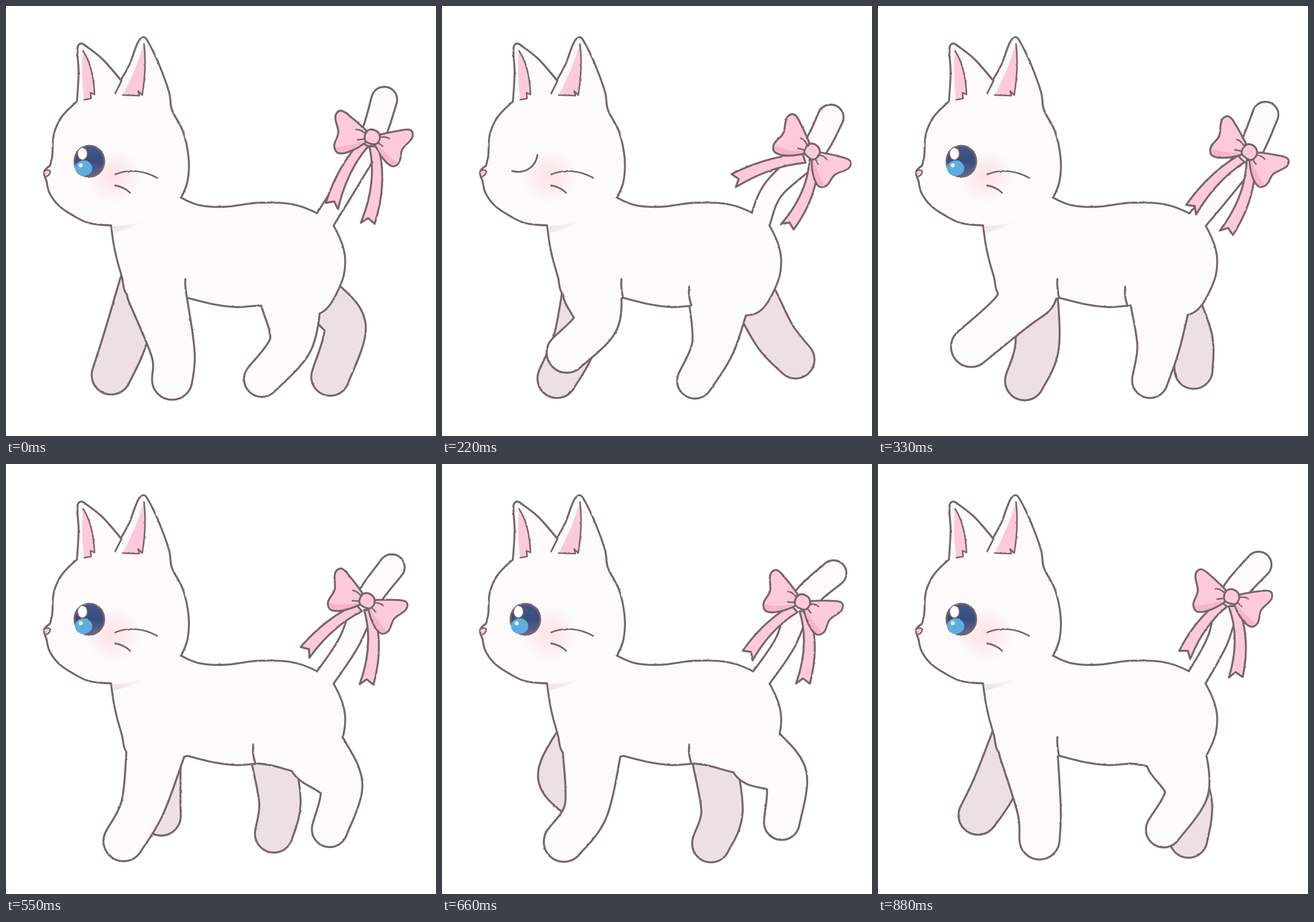
Animation, 748 px wide and 748 px high, one loop 990 ms. Source, as an HTML page:

```html
<!DOCTYPE html>
<html lang="en">
<head>
<meta charset="utf-8">
<title>Walking cat</title>
<style>
  html, body { margin: 0; width: 100%; height: 100%; overflow: hidden; background: #fff; }
  svg { display: block; width: 100vw; height: 100vh; }
  .pose { opacity: 0; animation: show 990ms step-end infinite; }
  @keyframes show { 0% { opacity: 1; } 11.1111% { opacity: 0; } 100% { opacity: 0; } }
  .line, .rim { fill: none; stroke: #77656a; stroke-width: 3.4; stroke-linecap: round; stroke-linejoin: round; }
  .rim { stroke-width: 6.8; }
  .fur { fill: #fcfafb; }
  .far { fill: #ece0e3; }
  .ear { fill: #ffc8dc; }
  .bow { fill: #fec9db; }
  .fold { fill: #f6b5c6; }
</style>
</head>
<body>
<svg viewBox="0 0 748 748">
  <defs>
    <radialGradient id="blush">
      <stop offset="0" stop-color="#ffd6d8" stop-opacity=".65"/>
      <stop offset=".5" stop-color="#ffdcde" stop-opacity=".45"/>
      <stop offset="1" stop-color="#ffe4e6" stop-opacity="0"/>
    </radialGradient>
    <linearGradient id="iris" x2="0" y2="1">
      <stop offset="0" stop-color="#41598a"/>
      <stop offset=".5" stop-color="#384d7d"/>
      <stop offset="1" stop-color="#626a8e"/>
    </linearGradient>
    <linearGradient id="chin">
      <stop offset="0" stop-color="#e6d9dd" stop-opacity=".7"/>
      <stop offset="1" stop-color="#e6d9dd" stop-opacity="0"/>
    </linearGradient>
    <filter id="pencil" filterUnits="userSpaceOnUse" x="0" y="0" width="748" height="748" color-interpolation-filters="sRGB">
      <feTurbulence type="fractalNoise" baseFrequency=".12" numOctaves="2" seed="4"/>
      <feDisplacementMap in="SourceGraphic" scale="2" xChannelSelector="R" yChannelSelector="G"/>
    </filter>
  </defs>
  <g id="stage" filter="url(#pencil)"></g>
</svg>
<script>
const STEPS = 9, STEP_MS = 110;
const KEY_STEPS = [0, 2, 3, 4, 6, 8];
const LINE = 3.4;

const numbers = text => text.match(/-?[\d.]+/g).map(Number);
const mix = (a, b, t) => a + (b - a) * t;
const mixAll = (a, b, t) => a.map((v, i) => mix(v, b[i], t));

// Values at the key steps, blended linearly in between.
function track(text) {
  const keys = text.split('|').map(numbers);
  return step => {
    const i = KEY_STEPS.findLastIndex(key => key <= step);
    if (KEY_STEPS[i] === step) return keys[i];
    return mixAll(keys[i], keys[i + 1], (step - KEY_STEPS[i]) / (KEY_STEPS[i + 1] - KEY_STEPS[i]));
  };
}

// Each leg: hip root, how far the hip follows the knee, radii, and knee and foot positions.
const legs = {
  nearFront: { root: [261, 495], follow: 0, radii: [51, 38, 35],
    joints: track('290 600 289 650|268 550 217 603|235 530 162 593|225 590 197 655|251 600 212 657|280 600 281 653') },
  nearHind: { root: [495, 508], follow: .55, radii: [53, 37, 31],
    joints: track('496 585 445 649|472 590 440 652|488 590 473 651|568 575 535 648|598 545 591 623|537 570 497 636') },
  farFront: { root: [270, 480], follow: .55, radii: [37, 38, 34],
    joints: track('207 580 183 642|232 580 200 648|277 590 255 652|326 597 315 650|205 540 225 575|203 560 174 611') },
  farHind: { root: [420, 515], follow: .8, radii: [38, 36, 33],
    joints: track('590 560 564 645|580 575 615 615|546 580 549 633|466 575 464 626|487 605 468 660|545 590 540 652') }
};
const bowAt = track('637 228 0 0|644 253 24 -22|646 254 20 0|629 236 12 4|627 240 11 6|615 231 2 6'); // x, y, tilt, tail bend
const tailTip = track('658 163|676 194|674 189|661 169|681 190|662 175');
const ribbonEnds = track('571 340 630 369|516 301 604 376|551 348 609 386|516 317 627 376|538 327 628 373|539 325 622 362');

// Smooth curve through points; listed indices stay sharp.
function curve(text, sharp = []) {
  const list = numbers(text), n = list.length / 2;
  const at = i => list.slice((i + n) % n * 2, (i + n) % n * 2 + 2);
  const handle = (i, length) => {
    const [ax, ay] = at(i - 1), [bx, by] = at(i + 1), [x, y] = at(i);
    const k = sharp.includes(i % n) ? 0 : length / Math.hypot(bx - ax, by - ay);
    return [x + (bx - ax) * k, y + (by - ay) * k];
  };
  let d = `M${at(0)}`;
  for (let i = 0; i < n; i++) {
    const p = at(i), q = at(i + 1), reach = Math.hypot(q[0] - p[0], q[1] - p[1]) * .34;
    d += `C${handle(i, reach)} ${handle(i + 1, -reach)} ${q}`;
  }
  return d + 'Z';
}

const path = (d, cls) => `<path d="${d}" class="${cls}"/>`;
const line = (d, width = LINE) => `<path d="${d}" class="line" style="stroke-width:${width}"/>`;
const shape = (d, cls) => path(d, cls) + line(d);

// One outline around several overlapping shapes.
const merged = (parts, cls) => parts.map(d => path(d, 'rim')).join('') + parts.map(d => path(d, cls)).join('');

const circle = ([x, y, r]) => `M${x - r},${y}a${r},${r} 0 1 0 ${2 * r},0a${r},${r} 0 1 0 ${-2 * r},0`;

const spline = (a, b, c, d, t) => b.map((v, i) =>
  v + t / 2 * (c[i] - a[i] + t * (2 * a[i] - 5 * v + 4 * c[i] - d[i] + t * (3 * (v - c[i]) + d[i] - a[i]))));

// Tube swept along [x, y, radius] nodes.
function limb(nodes, samples = 30) {
  const at = i => nodes[Math.max(0, Math.min(nodes.length - 1, i))];
  let d = '';
  for (let s = 0; s <= samples * (nodes.length - 1); s++) {
    const i = Math.min(Math.floor(s / samples), nodes.length - 2);
    const [x, y, r] = spline(at(i - 1), at(i), at(i + 1), at(i + 2), s / samples - i);
    d += circle([x, y, r - LINE / 2].map(v => +v.toFixed(1)));
  }
  return d;
}

function leg({ root: [x, y], follow, radii, joints }, step) {
  const [kneeX, kneeY, footX, footY] = joints(step);
  return limb([[mix(x, kneeX, follow), y, radii[0]], [kneeX, kneeY, radii[1]], [footX, footY, radii[2]]]);
}

function tail(step) {
  const [x, y, , bend] = bowAt(step), base = [553, 375];
  return limb([[...base, 18], [(base[0] + x) / 2 + bend, (base[1] + y) / 2 + 5, 18], [x, y, 21], [...tailTip(step), 22.5]]);
}

const torso = curve(`184,378 191,425 203,470 214,503 260,515 316,506 360,517 400,522 447,520 540,535
  578,490 588,437 569,384 548,366 500,347 440,344 380,351 335,348 302,334 250,320`, [0, 5, 18]);
const head = curve(`303,333 314,305 316,265 306,218 287,181 282,150 262,96 245,62 239,56 231,64 216,103 200,132
  166,93 138,71 130,67 126,74 128,115 125,167 99,193 85,223 82,262 78,279 68,289 72,304 77,324 92,345
  116,362 145,376 186,380`, [0, 11, 17, 21, 28]);

const innerEar = (rim, edge) => path(rim + edge, 'ear') + line(rim, 2.7);
const ears = line('M201,130L190,152', 3) +
  innerEar('M134,78Q152,105 154,154L147,151L148,161L136,163', 'Q130,115 134,78Z') +
  innerEar('M240,66Q245,105 237,155L230,148L232,156L203,155', 'Q227,110 240,66Z');

const openEye = `
  <ellipse cx="145" cy="270" rx="26" ry="27" fill="url(#iris)" stroke="#7d646b" stroke-width="3"/>
  <ellipse cx="135" cy="282" rx="15" ry="13.5" fill="#5eade0"/>
  <ellipse cx="133" cy="257" rx="8.5" ry="11" fill="#fff" stroke="#7d646b" stroke-width="1.5"/>
  <circle cx="130" cy="277" r="3.5" fill="#e4f5ff"/>`;
const nose = 'M66,288Q72,283 77,287Q77,294 70,297';
const face = step => `
  <circle cx="187" cy="296" r="48" fill="url(#blush)"/>
  <path d="M184,383Q215,383 242,372Q220,388 187,394Z" fill="url(#chin)"/>
  ${path(nose + 'Z', 'ear')}${line(nose, 2.4)}
  ${line('M190,293C212,283 240,286 263,299', 2.8)}${line('M190,312Q206,315 216,325', 2.8)}
  ${step === 2 ? line('M122,287C140,292 162,284 166,259', 3) : openEye}`;

// Forked strip from start to end, bowed sideways by bulge.
function ribbon(start, end, bulge) {
  const dx = end[0] - start[0], dy = end[1] - start[1], length = Math.hypot(dx, dy);
  const [ux, uy] = [dx / length, dy / length];
  const off = ([x, y], side, along = 0) => [x - uy * side + ux * along, y + ux * side + uy * along];
  const middle = mixAll(start, end, .5);
  return shape(`M${off(start, 8)}Q${off(middle, bulge + 9)} ${off(end, 12, 9)}L${end}
    L${off(end, -12, 9)}Q${off(middle, bulge - 9)} ${off(start, -8)}Z`, 'bow');
}

const loop = curve('-11,-12 -37,-35 -55,-46 -64,-36 -59,-8 -66,16 -58,28 -34,23 -11,9', [0, 8]);
const knot = curve('-11,-8 0,-13 12,-6 11,9 0,12 -11,8');
const bowSide = path(loop, 'bow') + path('M-64,17Q-45,18 -13,6L-32,21Q-58,34 -64,17Z', 'fold') +
  line(loop) + line('M-11,-5Q-20,-14 -28,-13M-12,3L-25,5', 2.6);

function bow(step) {
  const [x, y, tilt] = bowAt(step), [leftX, leftY, rightX, rightY] = ribbonEnds(step);
  return ribbon([x - 14, y + 12], [leftX, leftY], 14) + ribbon([x + 3, y + 16], [rightX, rightY], -20) + `
    <g transform="translate(${x} ${y}) rotate(${tilt})">
      ${bowSide}
      <g transform="rotate(30) scale(-.95 .95)">${bowSide}</g>
      <g transform="rotate(12)">${shape(knot, 'bow')}</g>
    </g>`;
}

function cat(step) {
  const at = name => leg(legs[name], step);
  const shoulderCrease = step < 4 || step > 6 ? line('M312,475Q311,490 315,508') : '';
  const hipCrease = step > 1 && step < 7 ? line('M430,488Q428,506 434,521') : '';
  return merged([at('farFront')], 'far') + merged([at('farHind')], 'far') +
    merged([torso, head, at('nearFront'), at('nearHind'), tail(step)], 'fur') +
    shoulderCrease + hipCrease + ears + face(step) + bow(step);
}

document.getElementById('stage').innerHTML = Array.from({ length: STEPS }, (_, step) =>
  `<g class="pose" style="animation-delay:${(step - STEPS) * STEP_MS}ms">${cat(step)}</g>`).join('');
</script>
</body>
</html>
```
